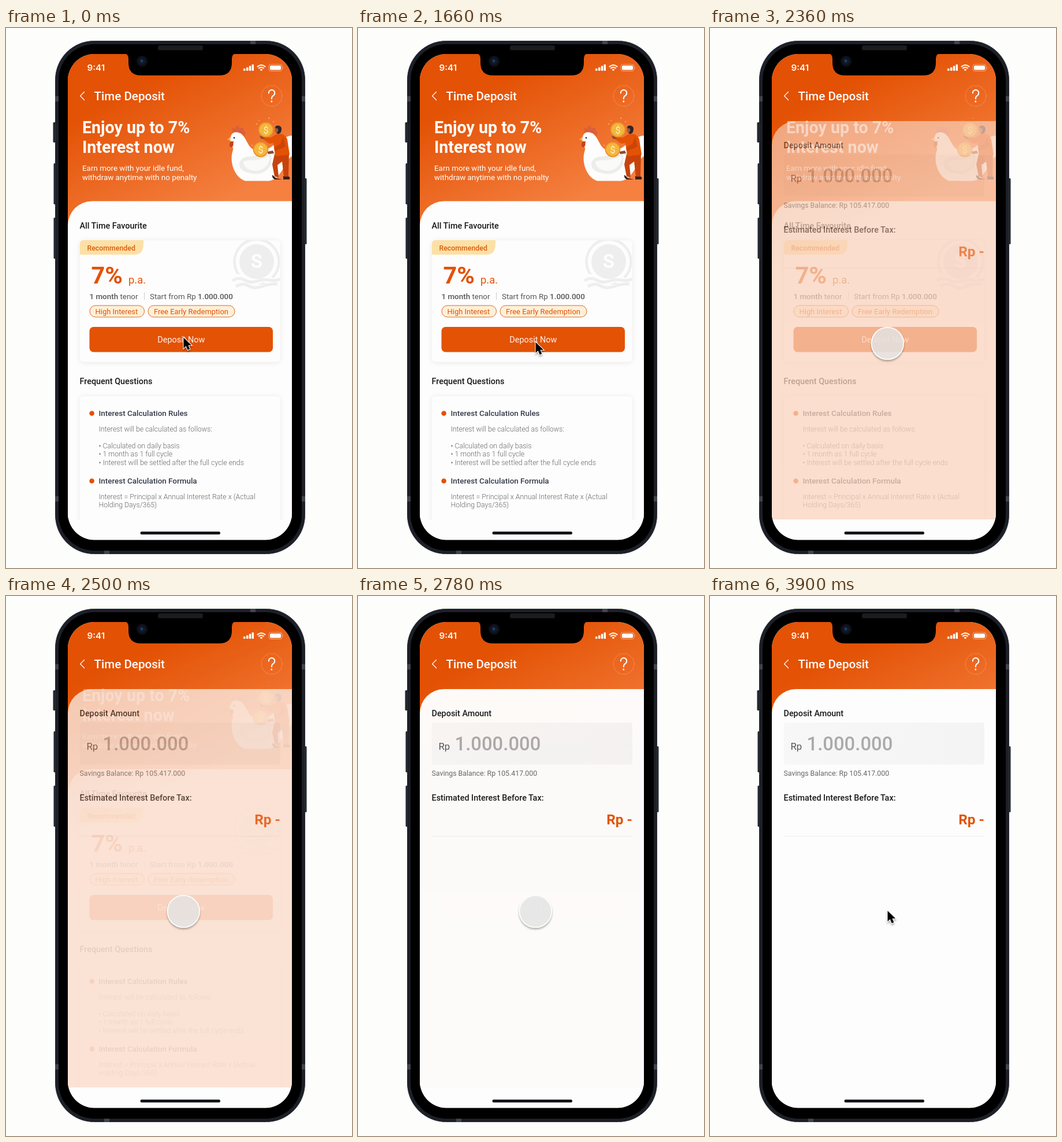
Recreate the animation shown at these times as an HTML page. Size 599x934 px, loop 4 s.

```html
<!DOCTYPE html>
<html lang="en">
<head>
<meta charset="utf-8">
<title>Time Deposit</title>
<style>
  html, body { margin: 0; width: 100%; height: 100%; overflow: hidden; background: #fdfdfb; }
  svg { display: block; width: 599px; height: 934px; }
  text { font-family: Roboto, sans-serif; white-space: pre; }
  .m { font-weight: 500; }
  .sb { font-weight: 600; }
  .b { font-weight: 700; }
  .w { fill: #fff; }
  .o { fill: #e35205; }
  .h { font-size: 14.4px; font-weight: 500; fill: #17191c; }
  .q { font-size: 13.45px; font-weight: 500; fill: #343a46; }
  .s { font-size: 12.3px; font-weight: 300; fill: #666; }
  .t { font-size: 13.4px; fill: #555; }
  .coin { fill: #f5b53c; stroke: #e8932c; stroke-width: 2; }
</style>
</head>
<body>
<svg viewBox="0 0 599 934">
  <defs>
    <linearGradient id="orange" gradientUnits="userSpaceOnUse" x1="250" y1="90" x2="360" y2="310">
      <stop stop-color="#e35205"/><stop offset="1" stop-color="#f58040"/>
    </linearGradient>
    <linearGradient id="field" x2="1">
      <stop stop-color="#f7f7f7"/><stop offset="1" stop-color="#f4f4f4"/>
    </linearGradient>
    <clipPath id="screen"><rect x="107" y="45" width="388" height="840.5" rx="46"/></clipPath>
    <clipPath id="view"><rect x="107" y="45" width="388" height="805"/></clipPath>
    <clipPath id="card"><rect x="128" y="367" width="346.5" height="210" rx="6"/></clipPath>
    <filter id="soft" x="-10%" y="-10%" width="120%" height="120%">
      <feDropShadow dx="0" dy="1" stdDeviation="4" flood-opacity=".09"/>
    </filter>
    <filter id="lift" x="-40%" y="-40%" width="180%" height="180%">
      <feDropShadow dx="0" dy="2.5" stdDeviation="1.8" flood-opacity=".35"/>
    </filter>
  </defs>
  <rect width="599" height="934" fill="#fdfdfb"/>

  <!-- phone body -->
  <g fill="#24262e">
    <rect x="81.5" y="163" width="6" height="35" rx="1.5"/>
    <rect x="82.5" y="234" width="5" height="71" rx="1.5"/>
    <rect x="82.5" y="328" width="5" height="71" rx="1.5"/>
    <rect x="514" y="260" width="6.5" height="114" rx="1.5"/>
  </g>
  <rect x="85.5" y="22.5" width="432" height="887" rx="67" fill="#1d2028" stroke="#282b34"/>
  <g fill="#41454f">
    <rect x="85" y="118" width="7" height="9"/><rect x="511" y="118" width="7" height="9"/>
    <rect x="85" y="810" width="7" height="9"/><rect x="511" y="810" width="7" height="9"/>
    <rect x="423" y="22" width="9" height="7"/><rect x="170" y="903" width="9" height="7"/>
  </g>
  <rect x="91" y="28" width="421" height="876" rx="62"/>

  <g clip-path="url(#screen)">
    <rect x="107" y="45" width="388" height="841" fill="#fdfdfd"/>
    <rect x="107" y="45" width="388" height="805" fill="url(#orange)"/>

    <g id="offer" clip-path="url(#view)">
      <rect x="107" y="45" width="388" height="297" fill="url(#orange)"/>
      <g class="w">
        <text class="sb" x="132" y="181.500" font-size="28.6">Enjoy up to 7%</text>
        <text class="sb" x="132" y="215.500" font-size="28.6">Interest now</text>
        <text x="132" y="246.500" font-size="13.4">Earn more with your idle fund,</text>
        <text x="132" y="263" font-size="13.4">withdraw anytime with no penalty</text>
      </g>

      <!-- hen, coins and carrier -->
      <path d="M394 184C389 174 393 169 397 175C398 167 404 168 404 175C407 170 414 173 410 178C416 178 416 184 411 187Z" fill="#d8603a"/>
      <path d="M389 188L383 193L390 195Z" fill="#f5b53c"/>
      <path d="M388.500 192C389 181 396 179 403 181C411 183 414 192 420 202C427 214 443 216 457 207C471 198 481 187 495 186V222C484 226 478 262 455 264.500H414C395 258 387 232 392 214C396 205 388 204 388.500 192Z" fill="#fdfdfd"/>
      <path d="M389 196C385 202 387 207 391 206C395 204 393 199 394 196Z" fill="#c9431a"/>
      <circle cx="395" cy="190" r="1.400" fill="#333"/>
      <path d="M404 234C408 217 430 224 458 218C465 240 447 255 429 252C414 251 402 244 404 234Z" fill="#ededeb"/>
      <path d="M411 231C423 226 438 232 456 221C458 237 444 248 430 247C418 246 411 239 411 231Z" fill="#fafafa"/>
      <g fill="#2d2528">
        <path d="M461 254L468 260L478 262H466Q460 260 461 254Z"/>
        <path d="M480 256L490 257Q493 261 490 262H480Z"/>
      </g>
      <path d="M465 218L490 217L489 257H481L478 231L470 237L472 258L465 257L461 236Z" fill="#c8430b"/>
      <path d="M466 185C474 181 484 183 487 193L491 219L466 222L463 199L456 200L443 191L446 186L458 190Z" fill="#e35205"/>
      <path d="M446 185L439 187L442 192L448 191ZM462 212L452 214L454 218L464 217Z" fill="#8c4a34"/>
      <path d="M480 188L484 205L466 213L464 207L475 200Z" fill="#cc4508"/>
      <circle cx="471" cy="176.500" r="5.500" fill="#a4573d"/>
      <path d="M466 173Q466 168 473 169Q479 171 476 180Q473 185 468 182Q472 180 471 174Z" fill="#2d2528"/>
      <g text-anchor="middle" font-size="17">
        <circle class="coin" cx="450" cy="176" r="12.300"/><text x="450" y="182" fill="#fff0ba">$</text>
        <circle class="coin" cx="441" cy="210" r="12.300"/><text x="441" y="216" fill="#fff0ba">$</text>
      </g>
      <g fill="#f8c45b">
        <circle cx="434" cy="166" r="1"/><circle cx="438" cy="160" r=".8"/><circle cx="455" cy="156" r="1"/>
        <circle cx="463" cy="162" r=".9"/><circle cx="426" cy="203" r=".9"/>
      </g>

      <path d="M107 850V341.500A42 42 0 0 1 149 299.500H495V850Z" fill="#fdfdfd"/>
      <text class="h" x="127.500" y="347">All Time Favourite</text>
      <rect x="128" y="367.500" width="346.500" height="210" rx="6" fill="#fdfdfd" filter="url(#soft)"/>
      <g clip-path="url(#card)">
        <g fill="none" stroke="#eeeeee" stroke-width="5">
          <circle cx="434" cy="404" r="38.500" stroke-width="4.500"/>
          <path d="M391 437Q402 429 413 437T435 437T456 437T476 436" stroke="#fdfdfd" stroke-width="14"/>
          <path d="M392 437Q403 430 413 436T434 438T456 436T476 434M398 447Q410 440 420 446T444 447T470 443"/>
        </g>
        <circle cx="434" cy="404" r="30" fill="#eeeeee"/>
        <text class="b" x="434" y="415" font-size="33" text-anchor="middle" fill="#fdfdfd">S</text>
        <path d="M128 367H238V376Q237 392 222 392H128Z" fill="#fce0a5"/>
      </g>
      <text class="m" x="140.500" y="384.500" font-size="12.35" fill="#dc5c0c">Recommended</text>
      <text class="b o" x="147.500" y="442" font-size="41.5">7%</text>
      <text class="o" x="212" y="442" font-size="18.4">p.a.</text>
      <text class="t" x="144.500" y="468.500"><tspan class="m">1 month</tspan> tenor</text>
      <path d="M239.500 457V470" stroke="#ccc"/>
      <text class="t" x="249" y="468.500">Start from Rp <tspan class="m">1.000.000</tspan></text>
      <g fill="#fdf0d8" stroke="#dd6a24">
        <rect x="145" y="480" width="94.500" height="20" rx="10"/>
        <rect x="246" y="480" width="150" height="20" rx="10"/>
      </g>
      <g class="o" font-size="12.95">
        <text x="154.500" y="494.500">High Interest</text>
        <text x="256" y="494.500">Free Early Redemption</text>
      </g>
      <rect class="o" x="144.500" y="517" width="317.500" height="43.500" rx="7"/>
      <text x="303.300" y="544" font-size="14.4" text-anchor="middle" fill="#fff3ea">Deposit Now</text>

      <text class="h" x="127.500" y="616">Frequent Questions</text>
      <rect x="128" y="637" width="346.500" height="240" rx="6" fill="#fdfdfd" filter="url(#soft)"/>
      <circle class="o" cx="148.600" cy="666.500" r="4.300"/>
      <circle class="o" cx="148.600" cy="783.500" r="4.300"/>
      <text class="q" x="160.500" y="671">Interest Calculation Rules</text>
      <text class="q" x="160.500" y="788">Interest Calculation Formula</text>
      <g class="s">
        <text x="160.500" y="697.500">Interest will be calculated as follows:</text>
        <text x="160.500" y="726.500">• Calculated on daily basis</text>
        <text x="160.500" y="741">• 1 month as 1 full cycle</text>
        <text x="160.500" y="755.500">• Interest will be settled after the full cycle ends</text>
        <text x="160.500" y="814.500">Interest = Principal x Annual Interest Rate x (Actual</text>
        <text x="160.500" y="829">Holding Days/365)</text>
      </g>
    </g>

    <g id="form" opacity="0">
      <path d="M107 850V203A42 42 0 0 1 149 161H495V850Z" fill="#fdfdfd"/>
      <text class="h" x="127.500" y="207.500">Deposit Amount</text>
      <rect x="127.500" y="219" width="347.500" height="72.500" rx="4" fill="url(#field)"/>
      <text x="139.500" y="265.500" font-size="16.8" fill="#555">Rp</text>
      <text class="m" x="167.500" y="267" font-size="32.8" fill="#aaa">1.000.000</text>
      <text x="127.500" y="311" font-size="12.35" fill="#666">Savings Balance: Rp 105.417.000</text>
      <text class="h" x="127.500" y="353.500">Estimated Interest Before Tax:</text>
      <text class="sb o" x="475" y="395" font-size="24.3" text-anchor="end">Rp -</text>
      <path d="M127 415.500H475" stroke="#eeeeee"/>
    </g>

    <!-- fixed header -->
    <g fill="none" stroke="#fff" stroke-linecap="round" stroke-linejoin="round">
      <path d="M135.500 110.500L128.500 117.500L135.500 124.500" stroke-width="1.300"/>
      <circle cx="460" cy="117.500" r="18" opacity=".22"/>
      <path d="M454.800 112.500A5.200 5.200 0 1 1 463 116.600Q459.800 118.700 459.800 122.400" stroke-width="2"/>
      <path d="M459.800 127V127.200" stroke-width="2.600"/>
    </g>
    <text class="m w" x="152.500" y="125" font-size="20.6">Time Deposit</text>
    <text class="w" x="140.500" y="73.500" style="font:600 15.2px Inter, sans-serif">9:41</text>
    <g class="w">
      <rect x="411" y="70" width="3.500" height="4" rx="1"/><rect x="416" y="68" width="3.500" height="6" rx="1"/>
      <rect x="420.800" y="65.500" width="3.500" height="8.500" rx="1"/><rect x="425.500" y="63" width="3.500" height="11" rx="1"/>
      <path d="M442 74.500L439.500 71.800Q442 69.800 444.500 71.800Z"/>
      <rect x="457" y="65" width="19" height="7.500" rx="1.800"/>
      <path d="M479.500 67V71Q481 69 479.500 67Z" opacity=".5"/>
    </g>
    <g fill="none" stroke="#fff">
      <path d="M434.800 67.300Q442 60.800 449.200 67.300M437.300 70Q442 66 446.700 70" stroke-width="2"/>
      <rect x="455" y="63" width="23" height="11.500" rx="3.500" opacity=".45"/>
    </g>
    <rect x="232.500" y="871" width="138.500" height="5" rx="2.500" fill="#151619"/>
  </g>

  <!-- notch -->
  <path d="M205 44Q212 45 212 53V60Q212 82 234 82H369Q391 82 391 60V53Q391 45 398 44Z"/>
  <rect x="263" y="30" width="78" height="8.500" rx="3" fill="#1b1c20"/>
  <circle cx="235.500" cy="57.500" r="9.500" fill="#0d1118"/>
  <circle cx="235.500" cy="57.500" r="5.500" fill="#111b2e"/>
  <circle cx="235" cy="57" r="2.200" fill="#213f6c"/>

  <g id="touch" visibility="hidden" filter="url(#lift)">
    <circle cx="307.300" cy="545.500" r="27.800" fill="#ebebeb" fill-opacity=".76" stroke="#fff" stroke-width="1.600"/>
  </g>
  <g id="cursor" filter="url(#lift)">
    <path d="M0 0V18.500L4.200 14.600L7.200 21.500L10.800 20L7.900 13.300H13.600Z" stroke="#fff" stroke-width="2" paint-order="stroke"/>
  </g>
</svg>
<script>
  const LOOP = 4000, BEAT = 140;
  const FADE = { start: 1845, length: 990 };
  const PRESS = { start: 1780, end: 3250 };
  const [offer, form, touch, cursor] =
    ['offer', 'form', 'touch', 'cursor'].map(id => document.getElementById(id));
  const clamp = x => Math.min(1, Math.max(0, x));
  const easeOut = x => 1 - (1 - clamp(x)) ** 2;
  const easeInOut = x => (x = clamp(x), x * x * (3 - 2 * x));

  // Each beat holds three evenly sampled poses for 20, 100 and 20 ms.
  function poseTime(t) {
    const rest = t % BEAT;
    const step = rest < 20 ? 0 : rest < 120 ? 1 : 2;
    return (Math.floor(t / BEAT) * 3 + step) * BEAT / 3;
  }

  function draw(t) {
    const s = poseTime(t);
    const mix = easeInOut((s - FADE.start) / FADE.length);
    offer.setAttribute('opacity', 1 - mix);
    form.setAttribute('opacity', mix);
    const pressed = s >= PRESS.start && s < PRESS.end;
    touch.setAttribute('visibility', pressed ? 'visible' : 'hidden');
    cursor.setAttribute('visibility', pressed ? 'hidden' : 'visible');
    const y = 535.5 + 8 * easeOut(s / 850) + (s >= PRESS.end ? 1 : 0);
    cursor.setAttribute('transform', `translate(307.500 ${y})`);
  }

  const begin = performance.now();
  function tick() {
    draw((performance.now() - begin) % LOOP);
    requestAnimationFrame(tick);
  }
  tick();
</script>
</body>
</html>
```
